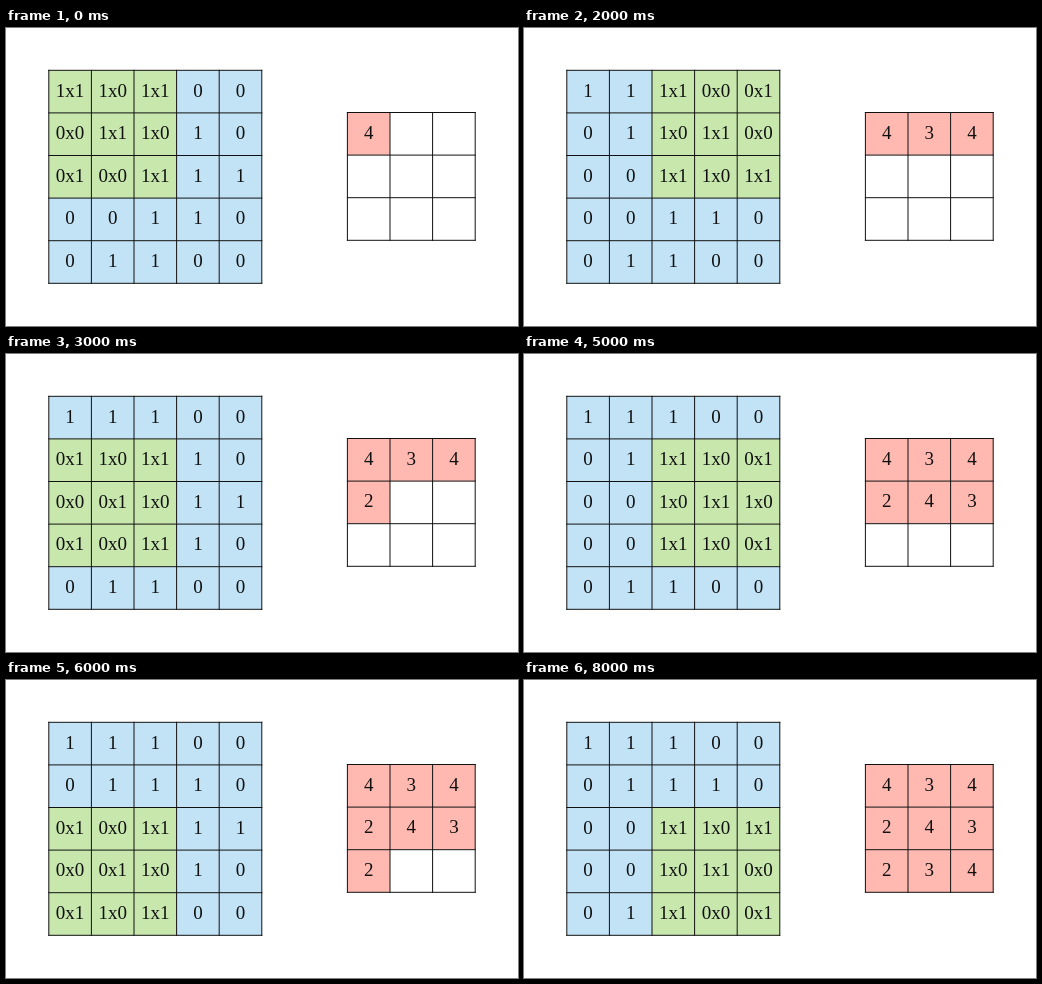
These frames come from a looping animation (512x298 px, 9000 ms). An HTML page with a canvas:

```html
<!DOCTYPE html>
<html lang="en">
<head>
<meta charset="utf-8">
<title>Convolution</title>
<style>
html, body { margin: 0; width: 100%; height: 100%; overflow: hidden; background: #fff; }
canvas { display: block; }
</style>
</head>
<body>
<canvas id="stage" width="512" height="298"></canvas>
<script>
const ctx = document.getElementById('stage').getContext('2d');
const STEP = 1000, CELL = 42.6;
const BLUE = '#c2e3f6', GREEN = '#c7e7ad', RED = '#ffb9b1', WHITE = '#fff';
const input = ['11100', '01110', '00111', '00110', '01100'];
const kernel = ['101', '010', '101'];

function convolve(row, col) {
  let sum = 0;
  for (let r = 0; r < 3; r++)
    for (let c = 0; c < 3; c++) sum += input[row + r][col + c] * kernel[r][c];
  return sum;
}

// cell(row, col) returns [fill, label]
function drawGrid(left, top, size, cell) {
  const side = size * CELL;
  for (let r = 0; r < size; r++)
    for (let c = 0; c < size; c++) {
      const [fill, label] = cell(r, c);
      const x = left + c * CELL, y = top + r * CELL;
      ctx.fillStyle = fill;
      ctx.fillRect(x, y, CELL, CELL);
      ctx.fillStyle = '#111';
      ctx.fillText(label, x + CELL / 2, y + 26.2);
    }
  ctx.beginPath();
  for (let i = 0; i <= size; i++) {
    const d = i * CELL;
    ctx.moveTo(left + d, top - 0.5);
    ctx.lineTo(left + d, top + side + 0.5);
    ctx.moveTo(left - 0.5, top + d);
    ctx.lineTo(left + side + 0.5, top + d);
  }
  ctx.strokeStyle = '#111';
  ctx.lineWidth = 1;
  ctx.stroke();
}

function draw(step) {
  const row = Math.floor(step / 3), col = step % 3;
  ctx.fillStyle = WHITE;
  ctx.fillRect(0, 0, 512, 298);
  ctx.font = '19px "Liberation Serif", "Times New Roman", serif';
  ctx.textAlign = 'center';
  drawGrid(42.8, 42.3, 5, (r, c) => {
    const weight = kernel[r - row]?.[c - col];
    return weight ? [GREEN, input[r][c] + 'x' + weight] : [BLUE, input[r][c]];
  });
  drawGrid(341.4, 84.5, 3, (r, c) =>
    r * 3 + c <= step ? [RED, convolve(r, c)] : [WHITE, '']);
}

const start = performance.now();
let shown = -1;
function tick() {
  const step = Math.floor((performance.now() - start) / STEP) % 9;
  if (step !== shown) draw(shown = step);
  requestAnimationFrame(tick);
}
tick();
</script>
</body>
</html>
```
